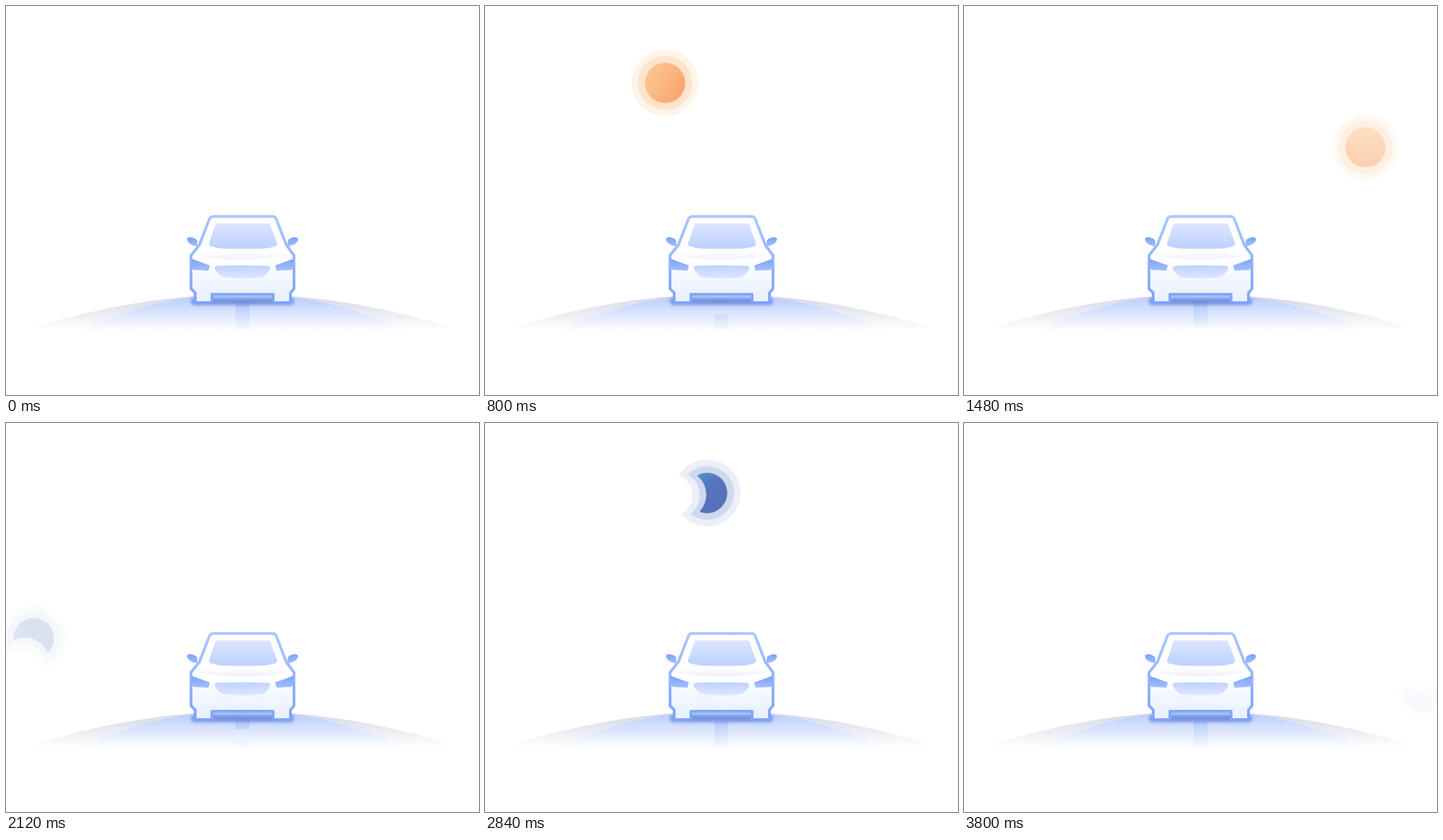
Animation of 680x560 px, one loop 3.84 s. Source, as an HTML page:

```html
<!DOCTYPE html>
<html lang="en">
<head>
<meta charset="utf-8">
<title>Day and night drive</title>
<style>
  html, body { margin: 0; width: 100%; height: 100%; overflow: hidden; background: #fff; }
  svg { display: block; width: 680px; height: 560px; }

  /* Sun and moon share one arc, half a loop apart; 40 ms per step */
  .orbit {
    transform-origin: 341px 421px;
    animation: orbit 3840ms steps(24) infinite;
  }
  .moon { animation-delay: -1920ms; }
  @keyframes orbit {
    0% { transform: rotate(-88deg); opacity: 0; }
    25% { transform: rotate(-.2deg); opacity: 1; }
    50%, 100% { transform: rotate(87.6deg); opacity: 0; }
  }

  .lane {
    stroke-dasharray: 42 18;
    animation: lane 480ms steps(12) infinite;
  }
  @keyframes lane { to { stroke-dashoffset: 60px; } }
</style>
</head>
<body>
<svg viewBox="0 0 680 560">
  <defs>
    <linearGradient id="sun" x1=".15" y1=".15" x2=".85" y2=".85">
      <stop stop-color="#fbba78"/><stop offset="1" stop-color="#f7934f"/>
    </linearGradient>
    <linearGradient id="moon" gradientUnits="userSpaceOnUse" x1="-13" y1="-28" x2="6" y2="2">
      <stop stop-color="#458fd0"/><stop offset=".6" stop-color="#4c70b9"/><stop offset="1" stop-color="#4e6bb5"/>
    </linearGradient>
    <linearGradient id="verge" gradientUnits="userSpaceOnUse" x1="0" y1="415" x2="0" y2="466">
      <stop stop-color="#d3d7e5"/><stop offset="1" stop-color="#fff"/>
    </linearGradient>
    <linearGradient id="road" gradientUnits="userSpaceOnUse" x1="0" y1="415" x2="0" y2="468">
      <stop stop-color="#b5c9fe"/><stop offset="1" stop-color="#fff"/>
    </linearGradient>
    <linearGradient id="lane" gradientUnits="userSpaceOnUse" x1="0" y1="428" x2="0" y2="467">
      <stop stop-color="#86a4ee" stop-opacity=".34"/><stop offset="1" stop-color="#a8c0f8" stop-opacity=".04"/>
    </linearGradient>
    <linearGradient id="line" gradientUnits="userSpaceOnUse" x1="0" y1="301" x2="0" y2="429">
      <stop stop-color="#adc8ff"/><stop offset="1" stop-color="#7ea4fb"/>
    </linearGradient>
    <linearGradient id="body" gradientUnits="userSpaceOnUse" x1="0" y1="364" x2="0" y2="416">
      <stop stop-color="#fff"/><stop offset="1" stop-color="#eaf1ff"/>
    </linearGradient>
    <linearGradient id="hood" x2="0" y2="1">
      <stop offset=".2" stop-color="#fff"/><stop offset="1" stop-color="#eef2fd"/>
    </linearGradient>
    <linearGradient id="glass" x2="0" y2="1">
      <stop stop-color="#dce6ff"/><stop offset="1" stop-color="#bdd1fe"/>
    </linearGradient>
    <linearGradient id="grille" x2="0" y2="1">
      <stop stop-color="#bfd2ff"/><stop offset="1" stop-color="#dde7ff"/>
    </linearGradient>
    <linearGradient id="lamp" x2="0" y2="1">
      <stop stop-color="#7ca1f8"/><stop offset="1" stop-color="#a3bffe"/>
    </linearGradient>
    <filter id="blur" x="-10%" y="-100%" width="120%" height="300%">
      <feGaussianBlur stdDeviation="2.2"/>
    </filter>
    <g id="side">
      <path d="M260 336Q261 332 267 333Q275 335 275 339V346Q262 344 260 336Z"/>
      <path d="M267 364L293 373.5L291 381L271 380Q268 380 267 376Z"/>
    </g>
  </defs>

  <g class="orbit">
    <g transform="translate(341 100)">
      <circle r="48" fill="#fef2e5"/>
      <circle r="39" fill="#fcdfc3"/>
      <circle r="29" fill="url(#sun)"/>
    </g>
  </g>
  <g class="orbit moon">
    <g transform="translate(341 100)">
      <path fill="#ebeff8" d="M-39-28A48 48 0 1 1-39 28A31 31 0 0 0-39-28Z"/>
      <path fill="#cdd7ee" d="M-26.3-28.5A38.8 38.8 0 1 1-26.3 28.5A34 34 0 0 0-26.3-28.5Z"/>
      <path fill="url(#moon)" d="M-12.8-26.1A29 29 0 1 1-12.8 26.1A35.5 35.5 0 0 0-12.8-26.1Z"/>
    </g>
  </g>

  <path fill="url(#verge)" d="M30 466Q340 365 650 466Z"/>
  <path fill="url(#road)" d="M100 469Q340 359 580 469Z"/>
  <path class="lane" d="M340 424V468" stroke="url(#lane)" stroke-width="20"/>
  <rect x="266" y="420" width="148" height="10.5" rx="5" fill="#5b80d6" opacity=".75" filter="url(#blur)"/>

  <path fill="url(#body)" stroke="url(#line)" stroke-width="4" stroke-linejoin="round"
    d="M298 303H383Q387 303 388.500 306.500L403 344L414 359V407L409 413V425Q409 427 407 427H386Q384 427 384 425V415H296V425Q296 427 294 427H274Q272 427 272 425V413L266 407V359L278 344L292.500 306.500Q294 303 298 303Z"/>
  <path fill="url(#hood)" d="M281 350H399L407 358Q380 365 340 365Q300 365 273 358Z"/>
  <path fill="url(#glass)" d="M304 313H377Q379 313 380 315L389.500 341Q390.500 345 387 346Q376 349.500 362 349.500H320Q306 349.500 295 346Q291 345 292 341L301 315Q302 313 304 313Z"/>
  <path fill="url(#grille)" d="M304 374Q340 372.500 376 374Q380.500 374.500 380 378Q375 388 367 390.500Q340 394 313 390.500Q305 388 300 378Q299.500 374.500 304 374Z"/>
  <use href="#side" fill="url(#lamp)"/>
  <use href="#side" fill="url(#lamp)" transform="matrix(-1 0 0 1 680 0)"/>
</svg>
</body>
</html>
```
